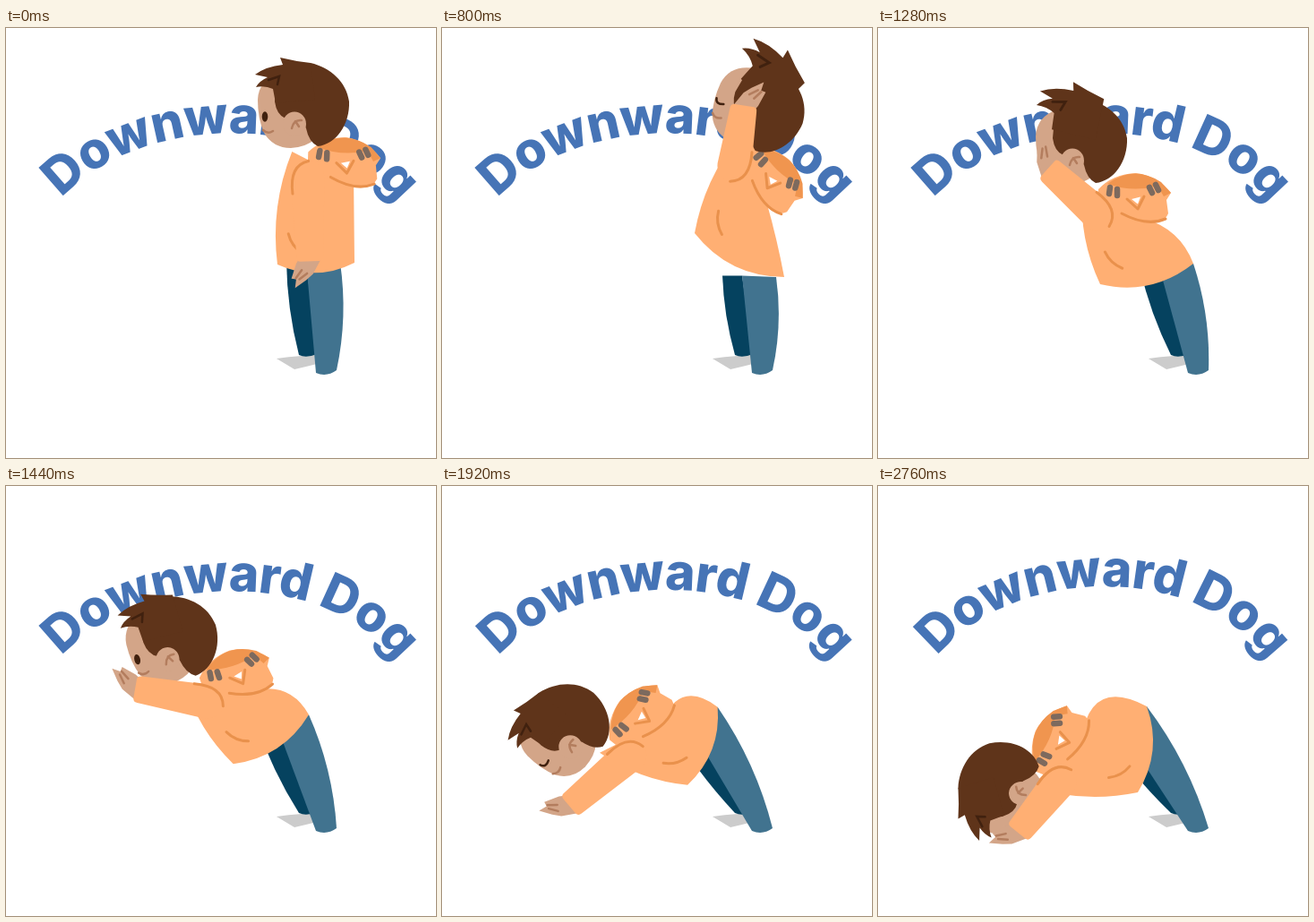
These frames come from a looping animation (480x480 px, 6720 ms). An HTML page:

```html
<!DOCTYPE html>
<html lang="en">
<head>
<meta charset="utf-8">
<title>Downward Dog</title>
<style>
html, body { margin: 0; width: 100%; height: 100%; overflow: hidden; background: #fff; }
svg { display: block; width: 100vw; height: 100vh; }
text { font: 800 57px Inter, "Noto Sans", sans-serif; letter-spacing: -1px; fill: #4674b6; }
.coat { fill: #ffaf73; }
.skin { fill: #d3a588; }
.hair { fill: #5f341a; }
.line { fill: none; stroke: #e9914c; stroke-width: 3; stroke-linecap: round; stroke-linejoin: round; }
.ink { fill: none; stroke: #40210f; stroke-width: 2.5; stroke-linecap: round; }
.mark { fill: none; stroke: #b37d5e; stroke-width: 2.5; stroke-linecap: round; }
</style>
</head>
<body>
<svg viewBox="0 0 480 480">
  <path id="arc" fill="none"/>
  <text><textPath href="#arc">Downward Dog</textPath></text>
  <path fill="#cccccc" d="M302 369Q315 367 330 366L349 364L347 375Q335 378 322 381Z"/>
  <path id="backLeg" fill="#05425f"/>
  <path id="frontLeg" fill="#41738f"/>
  <path id="torso" class="coat"/>
  <g id="hood"><g transform="translate(-288 -188)">
    <path class="coat" d="M246 180Q262 163 288 162Q312 165 327 184L322 192L324 207Q318 221 295 217Q262 212 246 192Z"/>
    <path fill="#f0954f" d="M256 174Q285 152 316 172L327 184L319 188L312 176Q285 184 256 174Z"/>
    <path fill="none" stroke="#7d6a5e" stroke-width="6.5" stroke-linecap="round" d="M259 178l-1 7M267 180v7M303 178l3 6M310 175l3 6"/>
    <path class="line" d="M278 191L290 202L297 188M272 207Q300 222 321 213"/>
    <path fill="#fff" d="M283 191L293 188.500L290 196.500Z"/>
  </g></g>
  <path id="crease" class="line"/>
  <g id="head"><g transform="translate(-333 -85)">
    <path class="skin" d="M281 80Q282 58 305 50L345 70V124Q335 133 318 134Q298 134 288 117Q281 101 281 80Z"/>
    <path class="hair" d="M302 60Q315 39 340 39C362 44 380 60 383 82C384 108 368 130 348 132Q338 127 335 112L325 94L312 101Q302 97 300 82Z"/>
    <g id="tuft"><g>
      <path class="hair" d="M301 84L298 68Q289 64 279 66Q283 59 292 55L278 52Q290 43 309 41L306 33Q322 37 340 39L345 80Z"/>
      <path class="ink" d="M293 58L305 54L303 63"/>
    </g></g>
    <ellipse class="skin" cx="322" cy="107" rx="13" ry="13.500"/>
    <path class="mark" d="M319 112Q321 102 330 103M323 104L327 110"/>
    <ellipse id="eyeOpen" fill="#40210f" cx="289" cy="99" rx="3.300" ry="5.800"/>
    <path id="eyeShut" class="ink" d="M284 97Q286 104 294 100"/>
    <path class="mark" d="M287 114Q292 119 298 115"/>
  </g></g>
  <g id="hand">
    <path class="skin" d="M-8 -10L12 -11L22 -8L36 -2L27 2L29 7L12 11L-8 11Z"/>
    <path class="mark" d="M15 -5L25 -1M15 2L26 3"/>
  </g>
  <g id="arm">
    <path id="sleeve" class="coat"/>
    <path class="line" d="M18 17Q-14 20 -18 -2"/>
  </g>
</svg>
<script>
const LOOP = 6720, STEP = 40;
const $ = id => document.getElementById(id);

// Key poses: head and hood as x, y, turn; both ends of the hem; arm angle and length.
// Everything else hangs from these.
const poses = [
  { t: 0,    head: [333, 85, 0],    hood: [379, 148, 2],   front: [303, 264], back: [389, 262], arm: [88, 92] },
  { t: 480,  head: [348, 84, 18],   hood: [375, 163, 29],  front: [290, 241], back: [386, 273], arm: [212, 76] },
  { t: 800,  head: [356, 88, 25],   hood: [371, 167, 42],  front: [282, 229], back: [382, 278], arm: [279, 66] },
  { t: 1280, head: [228, 126, 0],   hood: [288, 188, 0],   front: [248, 286], back: [352, 263], arm: [222, 74] },
  { t: 1640, head: [150, 231, -31], hood: [231, 236, -39], front: [265, 331], back: [322, 248], arm: [156, 86] },
  { t: 2280, head: [128, 302, -62], hood: [210, 272, -62], front: [283, 336], back: [298, 246], arm: [130, 84] },
  { t: 2760, head: [136, 336, -100], hood: [200, 283, -68], front: [290, 342], back: [300, 246], arm: [129, 72] }
];

// Slope through a key pose, flat at turning points so nothing overshoots.
function slope(k, part, i) {
  if (!poses[k - 1] || !poses[k + 1]) return 0;
  const rate = j => (poses[j + 1][part][i] - poses[j][part][i]) / (poses[j + 1].t - poses[j].t);
  const a = rate(k - 1), b = rate(k);
  return a * b > 0 ? 2 * a * b / (a + b) : 0;
}

function at(part, t) {
  const next = poses.findIndex(p => p.t > t);
  if (next < 0) return poses.at(-1)[part];
  const a = poses[next - 1], b = poses[next];
  const span = b.t - a.t, u = (t - a.t) / span, s = u * u * (3 - 2 * u);
  return a[part].map((v, i) => v + (b[part][i] - v) * s
    + span * u * (1 - u) * (slope(next - 1, part, i) * (1 - u) - slope(next, part, i) * u));
}

const rad = deg => deg * Math.PI / 180;
const setPath = (id, d) => $(id).setAttribute("d", d);
const place = (id, x, y, turn) =>
  $(id).setAttribute("transform", `translate(${x} ${y}) rotate(${turn})`);

// Point dx, dy inside a frame at x, y.
function inside([x, y, turn], dx, dy) {
  const c = Math.cos(rad(turn)), s = Math.sin(rad(turn));
  return [x + dx * c - dy * s, y + dx * s + dy * c];
}

// Curve from a to b, pushed to the left of travel by a share of its length.
function bow([ax, ay], [bx, by], push) {
  return `Q${(ax + bx) / 2 + (by - ay) * push} ${(ay + by) / 2 - (bx - ax) * push} ${bx} ${by}`;
}

function drawTorso(hood, front, back) {
  const collar = inside(hood, -60, -8), spine = inside(hood, 10, 25);
  const lean = Math.atan2(back[1] - spine[1], back[0] - spine[0]);
  const hunch = Math.max(0, 0.38 * (1.4 - lean));
  setPath("torso", `M${collar}L${spine}${bow(spine, back, hunch)}${bow(back, front, -0.24)
    .replace("Q", "Q")}${bow(front, collar, 0.13)}Z`.replace(bow(back, front, -0.24), bow(back, front, 0.24)));
  const turn = Math.atan2(back[1] - front[1], back[0] - front[0]) * 180 / Math.PI;
  const hem = [...front, turn];
  setPath("crease", `M${inside(hem, 13, -34)}Q${inside(hem, 16, -20)} ${inside(hem, 28, -12)}`);
}

// Feet stay put; the hips follow the back end of the hem.
function drawLegs([x, y]) {
  const hip = [Math.min(x, 373), y], heel = [369, 382], toe = [346, 385];
  const turn = Math.atan2(heel[1] - hip[1], heel[0] - hip[0]) * 180 / Math.PI;
  const inner = inside([...hip, turn], 0, 38);
  const far = [inner[0] - 22, inner[1]], farToe = [327, 365];
  setPath("frontLeg", `M${inner}L${hip}${bow(hip, heel, 0.09)}Q358 390 ${toe}${bow(toe, inner, 0)}Z`);
  setPath("backLeg", `M${far}${bow(far, farToe, -0.06)}Q335 369 347 364L${inner}Z`);
}

function drawArm(hood, [angle, len]) {
  const shoulder = inside(hood, -42, 20);
  const wrist = inside([...shoulder, angle], len, 0);
  const end = len + 2;
  place("arm", ...shoulder, angle);
  place("hand", ...wrist, angle + 33);
  setPath("sleeve", `M0 -19L${end - 5} -15Q${end} -15 ${end} -10V11Q${end} 15 ${end - 5} 15L0 19A19 19 0 0 1 0 -19Z`);
}

function drawHead(head, armAngle, t) {
  place("head", ...head);
  // The tuft flies up while the arm is raised.
  const lift = Math.max(0, -Math.sin(rad(armAngle)));
  $("tuft").setAttribute("transform",
    `translate(333 85) rotate(${28 * lift}) scale(${1 + 0.2 * lift}) translate(-333 -85)`);
  const shut = (t >= 640 && t < 1040) || t >= 1480;
  $("eyeOpen").style.display = shut ? "none" : "";
  $("eyeShut").style.display = shut ? "" : "none";
}

// The title's arc tightens a little near the end.
function drawTitle(t) {
  const k = Math.min(1, Math.max(0, (t - 1600) / 1120));
  setPath("arc", `M${62 + 4 * k} 190C${150 + 2 * k} ${92 - 7 * k} ${375 - k} ${88 - 7 * k} ${446 - 2 * k} 210l16 26`);
}

function draw(t) {
  const [hood, front, back, arm] = ["hood", "front", "back", "arm"].map(part => at(part, t));
  drawTitle(t);
  drawLegs(back);
  drawTorso(hood, front, back);
  place("hood", ...hood);
  drawHead(at("head", t), arm[0], t);
  drawArm(hood, arm);
}

const start = performance.now();
function tick() {
  const t = (performance.now() - start) % LOOP;
  draw(Math.floor(t / STEP) * STEP);
  requestAnimationFrame(tick);
}
tick();
</script>
</body>
</html>
```
